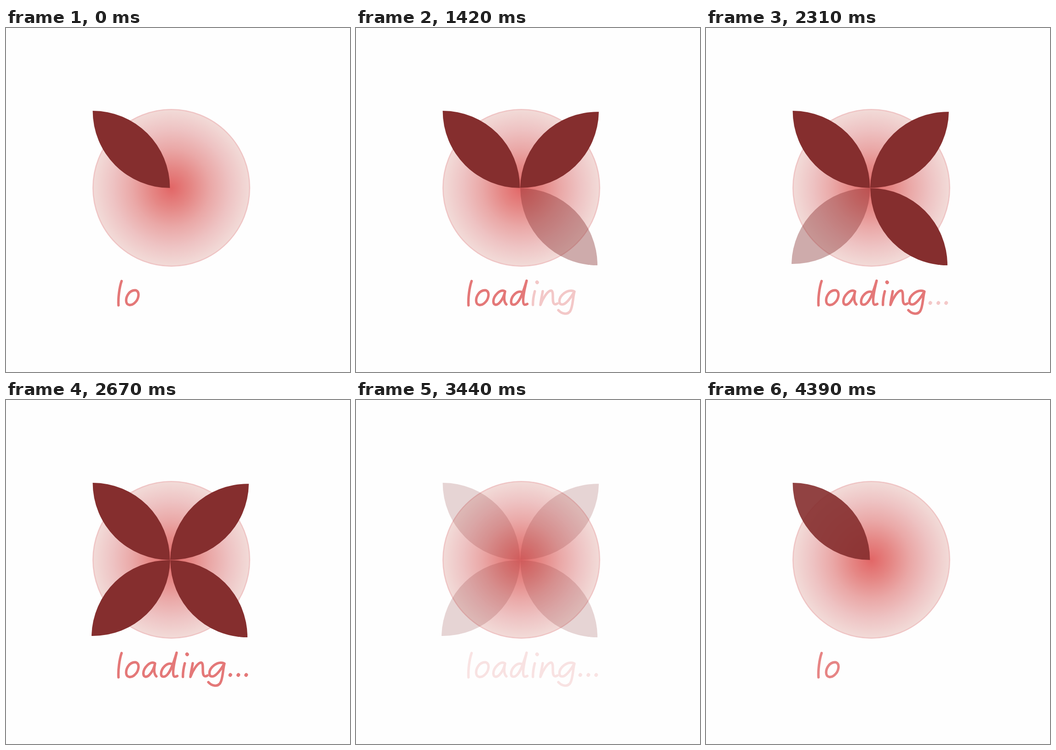
These frames come from a looping animation (748x748 px, 4.45 s). An HTML page:

```html
<!DOCTYPE html>
<html lang="en">
<head>
<meta charset="utf-8">
<title>Loading</title>
<style>
  html, body { margin: 0; width: 100%; height: 100%; overflow: hidden; background: #fefefe; }
  svg { display: block; width: 100%; height: 100%; }
  .petal { fill: #852e2e; }
  .letters { fill: none; stroke: #e47878; stroke-width: 5.4; stroke-linecap: round; stroke-linejoin: round; }
  .dots { stroke-width: 7.6; }
</style>
</head>
<body>
<svg viewBox="0 0 748 748" role="img" aria-label="loading...">
  <defs>
    <radialGradient id="glow">
      <stop offset="0" stop-color="#e26666"/>
      <stop offset=".25" stop-color="#e58684"/>
      <stop offset=".5" stop-color="#eaa8a7"/>
      <stop offset=".75" stop-color="#eec3c3"/>
      <stop offset="1" stop-color="#f2dbd8"/>
    </radialGradient>
  </defs>
  <circle cx="359.5" cy="347.5" r="170.2" fill="url(#glow)" stroke="#efc5c5" stroke-width="2.6"/>

  <g class="stage">
    <path class="petal" d="M188.5 180A167.7 167.7 0 0 1 356.5 347.8A167.7 167.7 0 0 1 188.5 180"/>
    <g class="letters">
      <path d="M251.3 550.3C246.5 564 243.6 587 244.6 603"/>
      <path d="M281 570.3C268 570 261 584 261.3 593C261.7 604 272 604.5 279.5 598C289 590 290.500 576 284.500 571.500Q283 570.300 281 570.300"/>
    </g>
  </g>

  <g class="stage">
    <path class="petal" d="M528 182.300A168 168 0 0 0 357 347.500A168 168 0 0 0 528 182.300"/>
    <g class="letters">
      <path d="M324 572.500C313 566.500 299 583 298.700 594C298.600 603 306 604 312 597.500C318 591 322 583 324 573.500C321.500 585 321.500 596 327 601"/>
      <path d="M361.500 574.500C350 569 337.500 584 337.200 595C337.200 603.500 345 603.500 351 597C358.500 588.500 364 573 371 549.500C365 573 360 600.500 366.500 601.500Q369.500 602 372.500 600"/>
    </g>
  </g>

  <g class="stage">
    <path class="petal" d="M357.300 348.200A167.700 167.700 0 0 1 525 516A167.700 167.700 0 0 1 357.300 348.200"/>
    <g class="letters">
      <path d="M388.800 572.500C386.500 581 384.500 592 384.700 602"/>
      <path class="dots" d="M393.600 552.800l.4 .4"/>
      <path d="M406 572.500C404.500 582 402 592 401 602C406 588 417 571 424 571C432 571.500 424 598 432 600.500Q435 601.500 438 599"/>
      <path d="M474 572.500C459 567 442.500 582 442.300 594C442.300 603.500 451 602.500 457 597C465 590 470 581 475 573C471 587 472 606 465.500 616C459 624.500 447 621.500 440 613.500"/>
    </g>
  </g>

  <g class="stage">
    <path class="petal" d="M186 513A168 168 0 0 0 357 348.200A168 168 0 0 0 186 513"/>
    <g class="letters dots">
      <path d="M487.500 598.200l.4 -.6M505 598.200l.4 -.6M522 598.200l.4 -.6"/>
    </g>
  </g>
</svg>
<script>
  const PHASE = 890, HOLD = 350, STEP = 60, PHASES = 5;
  const stages = [...document.querySelectorAll('.stage')];

  // Three phases add a petal, the fourth clears all, the fifth restores the first.
  function opacity(i, phase, fade) {
    if (phase === 4) return i ? 0 : fade;
    if (phase === 3) return 1 - fade;
    return Math.min(1, Math.max(0, phase + 1 + fade - i));
  }

  function draw(now) {
    const t = now % (PHASE * PHASES);
    const phase = Math.floor(t / PHASE);
    const local = t % PHASE;
    const fade = local < HOLD ? 0 : (Math.floor((local - HOLD) / STEP) + 1) / 10;
    stages.forEach((g, i) => g.style.opacity = opacity(i, phase, fade));
  }

  let start;
  function tick(now) {
    start ??= now;
    draw(now - start);
    requestAnimationFrame(tick);
  }
  draw(0);
  requestAnimationFrame(tick);
</script>
</body>
</html>
```
